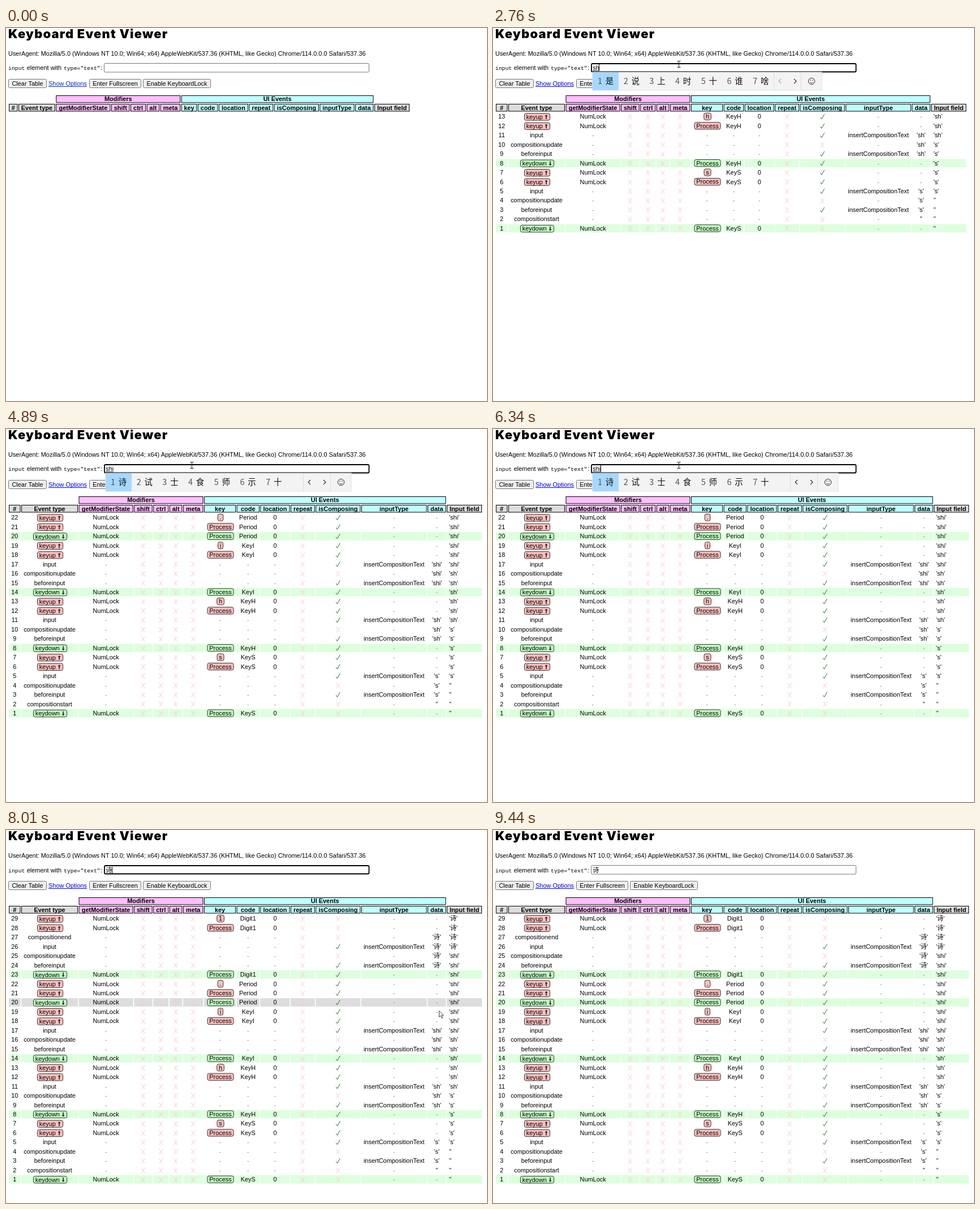
Recreate the animation shown at these times as an HTML page. Size 850 by 659 pixels, loop 9540 ms.

```html
<!DOCTYPE html>
<html lang="en">
<head>
<meta charset="utf-8">
<title>Keyboard Event Viewer</title>
<style>
html, body { margin: 0; width: 100%; height: 100%; overflow: hidden; background: #fff; }
svg { display: block; }
text { font: 10.95px "Liberation Sans", Arial, "Noto Sans CJK SC", sans-serif; white-space: pre; }
.m { text-anchor: middle; }
.b { font-weight: bold; text-anchor: middle; }
.h1 { font: 900 21.9px Inter, sans-serif; letter-spacing: 1.2px; }
.mono { font: 9.8px "Liberation Mono", monospace; }
.cand { font: 14.5px "Noto Sans CJK SC", "Noto Sans CJK", sans-serif; text-anchor: middle; }
</style>
</head>
<body>
<svg width="850" height="659" viewBox="0 0 850 659">
  <g id="page"></g><g id="table"></g><g id="field"></g><g id="cursor"></g>
</svg>
<script>
const LOOP = 9540, TOP = 149, STEP = 16.46, CELL = 14.8, GAP = 1.65;
const PINK = '#ffbfff', CYAN = '#bfffff', GRAY = '#ddd';

const ruler = document.createElement('canvas').getContext('2d');
ruler.font = '10.95px "Liberation Sans", Arial, "Noto Sans CJK SC", sans-serif';
const widthOf = s => ruler.measureText(s).width;

const text = (x, y, s, cls = '', fill = '#000') =>
  `<text x="${x}" y="${y}" class="${cls}" fill="${fill}">${s}</text>`;
const rect = (x, y, w, h, fill, stroke = 'none', r = 0, sw = 1) =>
  `<rect x="${x}" y="${y}" width="${w}" height="${h}" rx="${r}" fill="${fill}" stroke="${stroke}" stroke-width="${sw}"/>`;
const path = (d, stroke = '#333', fill = 'none', sw = 1) =>
  `<path d="${d}" stroke="${stroke}" fill="${fill}" stroke-width="${sw}"/>`;

// Value of the last [time, value] entry that has been reached
const at = (list, t) => list.reduce((v, [time, next]) => t >= time ? next : v, list[0][1]);

// Event log, oldest first
const log = [];
const add = (type, o) => log.push({ type, composing: true, input: '-', data: '-', ...o });
function press(code, key, before, after, first, last) {
  const quote = s => `'${s}'`, old = quote(before), now = quote(after);
  add('keydown', { key: 'Process', code, composing: !first, value: old });
  if (first) add('compositionstart', { composing: false, data: "''", value: old });
  if (before !== after) {
    const input = 'insertCompositionText';
    add('beforeinput', { input, data: now, value: old });
    add('compositionupdate', { composing: false, data: now, value: old });
    add('input', { input, data: now, value: now });
  }
  if (last) add('compositionend', { composing: false, data: now, value: now });
  for (const k of ['Process', key]) add('keyup', { key: k, code, composing: !last, value: now });
}
press('KeyS', 's', '', 's', true);
press('KeyH', 'h', 's', 'sh');
press('KeyI', 'i', 'sh', 'shi');
press('Period', '.', 'shi', 'shi');
press('Digit1', '1', 'shi', '诗', false, true);

const counts = [[0, 0], [2200, 5], [2350, 7], [2660, 11], [2760, 13], [3170, 17], [3300, 19],
  [4750, 20], [4890, 22], [6730, 27], [6880, 29]];
const values = [[0, ''], [2200, 's'], [2660, 'sh'], [3170, 'shi'], [6730, '诗']];
const candidates = [[0, ''], [2240, '是说三上时所岁'], [2660, '是说上时十谁啥'],
  [3170, '视是市时⑩X式'], [4750, '诗试士食师示十'], [6730, '']];
const caretOn = [[1000, 1460], [1970, 3730], [4215, 4750], [5300, 5810], [6340, 7290], [7800, 8350], [8880, 9390]];

const heads = ['#', 'Event type', 'getModifierState', 'shift', 'ctrl', 'alt', 'meta', 'key', 'code',
  'location', 'repeat', 'isComposing', 'inputType', 'data', 'Input field'];
const headFill = i => i < 2 || i > 13 ? GRAY : i < 7 ? PINK : CYAN;

function columns(n) {
  const widths = [n > 9 ? 20.3 : 15.3, n ? 99.8 : 64.6, 96, 32.4, 27, 22.4, 35.4, n ? 56 : 27.4,
    n > 19 ? 40.1 : 35.4, 52, 42.6, 79, n ? 115.5 : 61, 32.2, 62];
  let x = 5.2;
  return widths.map(w => {
    const col = { x, w, mid: x + w / 2 };
    x += w + GAP;
    return col;
  });
}

function pill(mid, y, label, down, arrow) {
  const w = widthOf(label) + (arrow ? 16 : 6.6), x = mid - w / 2, s = down ? -1 : 1;
  let out = rect(x, y - 6.2, w, 12.3, down ? '#bfffbf' : '#ffbfbf', '#333', 3) + text(x + 3.3, y + 3.8, label);
  if (arrow) out += path(`M${x + w - 6.5} ${y - 4 * s}l2.5 ${3 * s}h-1.7v${5 * s}h-1.6v${-5 * s}h-1.7z`, 'none', '#222');
  return out;
}

function drawRow(cols, e, number, index, hover) {
  const top = TOP + index * STEP, y = top + CELL / 2, base = y + 3.9;
  const down = e.type === 'keydown', fill = hover ? GRAY : down ? '#dfd' : '';
  const put = (i, s) => text(cols[i].mid, base, s, 'm', s === '-' ? '#888' : '#000');
  const mark = (i, ok) => {
    const x = cols[i].mid;
    return ok ? path(`M${x - 3.5} ${y + 1.2}l2 3.2l5 -8.6`, '#2a6a2a')
      : path(`M${x - 3} ${y - 4}l5.5 9M${x + 3.5} ${y - 4}l-7 9`, '#ffc4c4', 'none', .9);
  };
  let out = fill ? cols.map(c => rect(c.x, top, c.w, CELL, fill)).join('') : '';
  out += put(0, number);
  out += e.key ? pill(cols[1].mid + 1, y + .6, e.type, down, true) : put(1, e.type);
  out += put(2, e.key ? 'NumLock' : '-');
  for (const i of [3, 4, 5, 6, 10]) out += mark(i, false);
  out += e.key ? pill(cols[7].mid + 1, y, e.key, down) : put(7, '-');
  out += put(8, e.code || '-') + put(9, e.key ? '0' : '-') + mark(11, e.composing);
  return out + put(12, e.input) + put(13, e.data) + text(cols[14].x + 4, base, e.value);
}

function drawTable(n, hover) {
  const cols = columns(n);
  const group = (a, b, label, fill) => {
    const x = cols[a].x, w = cols[b].x + cols[b].w - x;
    return rect(x + .4, 119.5, w - .8, 12.2, fill, '#000') + text(x + w / 2, 129.4, label, 'b');
  };
  let out = group(2, 6, 'Modifiers', PINK) + group(7, 13, 'UI Events', CYAN);
  if (hover === -2) for (const i of [0, 1, 14]) out += rect(cols[i].x, 119, cols[i].w, 13.2, GRAY);
  cols.forEach((c, i) => {
    out += rect(c.x + .4, 134.5, c.w - .8, 12.5, headFill(i), '#000') + text(c.mid, 144.5, heads[i], 'b');
  });
  for (let i = 0; i < n; i++) out += drawRow(cols, log[n - 1 - i], n - i, i, i === hover);
  return out;
}

function drawPage(t) {
  const button = (x, w, label) => rect(x + .5, 90.5, w, 15, '#efefef', '#767676', 2) + text(x + w / 2 + .5, 102, label, 'm');
  const link = t < 900 ? '#0a2ccb' : '#0000ee', base = t < 6730 ? 74 : 74.8;
  return text(4, 18.2, 'Keyboard Event Viewer', 'h1') +
    text(4, 48.6, 'UserAgent: Mozilla/5.0 (Windows NT 10.0; Win64; x64) AppleWebKit/537.36 (KHTML, like Gecko) Chrome/114.0.0.0 Safari/537.36') +
    text(4, base, 'input', 'mono') + text(36.7, base, 'element with') +
    text(102, base, 'type="text"', 'mono') + text(167, base, ':') +
    button(4, 67, 'Clear Table') + button(147, 91, 'Enter Fullscreen') + button(242, 119, 'Enable KeyboardLock') +
    text(75, 102, 'Show Options', '', link) + path('M75 103.5H143', link);
}

function drawCandidates(chars) {
  const end = /[诗视]/.test(chars) ? 525 : 496;
  const right = end + 85, back = chars[0] === '诗' ? '#333' : '#aaa';
  let out = rect(176, 78, right - 176, 32, '#f3f3f3', '#e2e2e2') + rect(176, 78, 46, 32, '#a6d8ff');
  [...chars].forEach((c, i) => {
    const x = 189 + i * 45.7;
    out += text(x, 99, i + 1, 'cand', '#555') + text(x + 17, 99, c, 'cand', '#111');
  });
  out += path(`M${end + .5} 78v32M${end + 48.5} 78v32`, '#ddd');
  out += path(`M${end + 13} 90l-4 4l4 4`, back, 'none', 1.2) + path(`M${end + 36} 90l4 4l-4 4`, '#333', 'none', 1.2);
  const x = end + 67;
  return out + `<circle cx="${x}" cy="94" r="5.7" fill="none" stroke="#333"/>` +
    path(`M${x - 3} 95.5q3 3.6 6 0`) + rect(x - 2.8, 91.4, 1.5, 1.5, '#333') + rect(x + 1.3, 91.4, 1.5, 1.5, '#333');
}

function drawField(t) {
  const value = at(values, t), chars = at(candidates, t), w = widthOf(value), done = t >= 6730;
  const focus = t >= 950 && t < 9390;
  let out = focus ? rect(174, 63, 467.5, 14.5, '#fff', '#000', 2, 1.8) : rect(173.5, 62.5, 468, 15.5, '#fff', '#767676', 2);
  out += text(176.3, done ? 74.8 : 74, value);
  if (value && !done) out += path(`M176 75.7h${w}`, '#222', 'none', .9);
  if (caretOn.some(([a, b]) => t >= a && t < b)) out += rect(Math.floor(176.3 + w), done ? 65 : 64, 1, 12, '#000');
  return out + (chars ? drawCandidates(chars) : '');
}

// Pointer route as [time, x, y]
const route = [[30, 783, 640], [150, 700, 480], [300, 500, 220], [430, 370, 95], [560, 328, 64],
  [7720, 328, 64], [7780, 372, 60], [7870, 560, 150], [7960, 747, 298], [8010, 765, 318],
  [8200, 806, 430], [8400, 828, 555], [8600, 837, 662]];
function pointer(t) {
  const i = route.findIndex(p => t < p[0]);
  if (i < 1) return null;
  const [t0, x0, y0] = route[i - 1], [t1, x1, y1] = route[i], k = (t - t0) / (t1 - t0);
  return [x0 + (x1 - x0) * k, y0 + (y1 - y0) * k];
}

function drawCursor(p) {
  if (!p) return '';
  const [x, y] = p.map(v => Math.round(v) + .5);
  if (x > 173 && x < 642 && y > 58 && y < 79)
    return path(`M${x - 3} ${y - 6}h2.5l.5 .5l.5 -.5h2.5M${x} ${y - 5.5}v11M${x - 3} ${y + 5}h2.5l.5 -.5l.5 .5h2.5`, '#222');
  return path(`M${x} ${y}v11l2.5 -2.4l2 4.3l1.8 -.8l-1.9 -4.2h3.4z`, '#333', '#fff', .9);
}

// The highlight trails the pointer slightly; -2 is the upper header row
function hoverRow(t) {
  const p = pointer(t - 45);
  if (!p || p[0] > 840) return -1;
  if (p[1] > 119 && p[1] < 132) return -2;
  return p[1] < TOP ? -1 : Math.floor((p[1] - TOP) / STEP);
}

const shown = {};
function show(id, markup) {
  if (shown[id] === markup) return;
  document.getElementById(id).innerHTML = shown[id] = markup;
}

let tableKey;
const start = performance.now();
function frame() {
  const t = (performance.now() - start) % LOOP, n = at(counts, t), hover = hoverRow(t);
  show('page', drawPage(t));
  if (tableKey !== n + ':' + hover) {
    tableKey = n + ':' + hover;
    show('table', drawTable(n, hover));
  }
  show('field', drawField(t));
  show('cursor', drawCursor(pointer(t)));
  requestAnimationFrame(frame);
}
frame();
</script>
</body>
</html>
```
